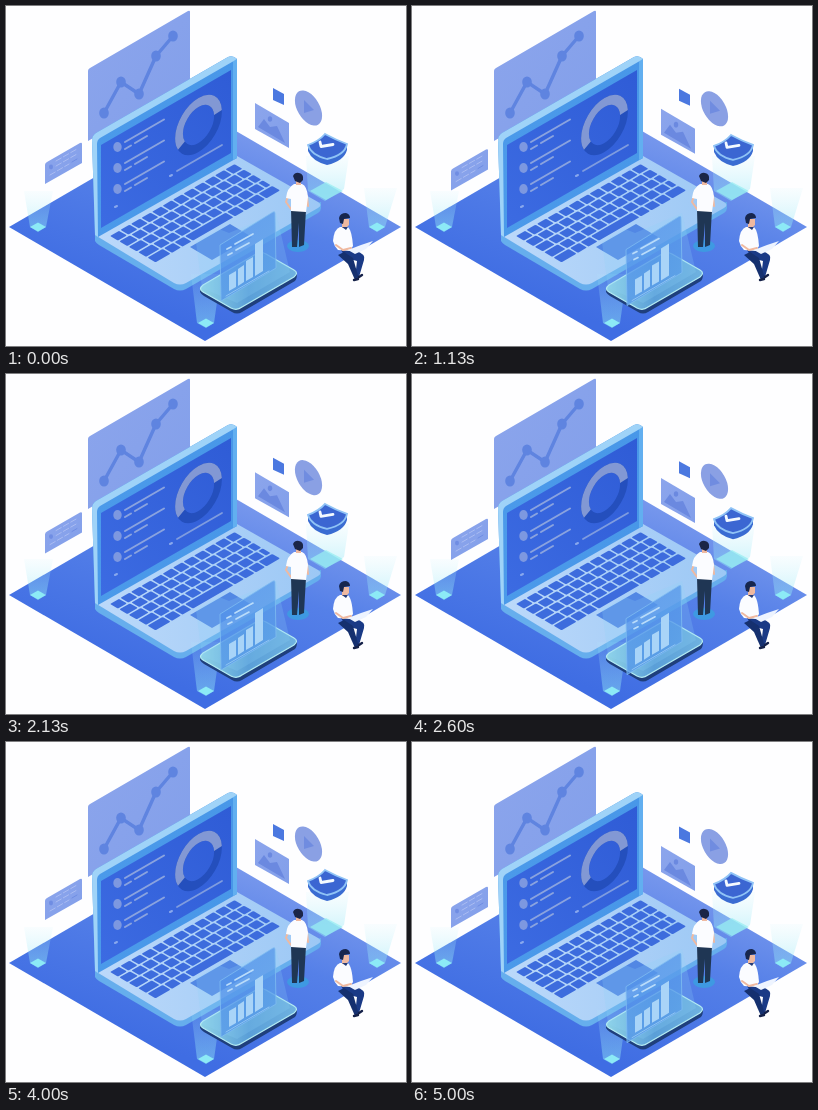
An HTML page for the animation above (5070 ms loop, 400 by 340 pixels).

```html
<!DOCTYPE html>
<html lang="en">
<head>
<meta charset="utf-8">
<title>Isometric workspace</title>
<style>
html, body { margin: 0; width: 100%; height: 100%; overflow: hidden; background: #fefeff; }
svg { display: block; width: 400px; height: 340px; }
.line { fill: none; stroke-linecap: round; stroke-linejoin: round; }
</style>
</head>
<body>
<svg viewBox="0 0 400 340">
  <defs>
    <linearGradient id="floor" x1=".8" y1=".1" x2=".35" y2=".85">
      <stop offset="0" stop-color="#829fee"/><stop offset=".45" stop-color="#5580e8"/><stop offset="1" stop-color="#3f6de3"/>
    </linearGradient>
    <linearGradient id="screen" x1="0" y1="1" x2="1" y2="0">
      <stop offset="0" stop-color="#3c6be2"/><stop offset="1" stop-color="#2f5cd6"/>
    </linearGradient>
    <linearGradient id="frame" x1="0" y1="0" x2="1" y2="0">
      <stop offset="0" stop-color="#4b9aea"/><stop offset="1" stop-color="#4897e8"/>
    </linearGradient>
    <linearGradient id="deck" x1="0" y1="0" x2="1" y2="0">
      <stop offset="0" stop-color="#bcd9fa"/><stop offset="1" stop-color="#9cc8f5"/>
    </linearGradient>
    <linearGradient id="card" x1="0" y1="0" x2="1" y2="1">
      <stop offset="0" stop-color="#8ca5ec"/><stop offset="1" stop-color="#829fea"/>
    </linearGradient>
    <linearGradient id="beam" x1="0" y1="1" x2="0" y2="0">
      <stop offset="0" stop-color="#8ee6f6" stop-opacity=".5"/><stop offset="1" stop-color="#b8f0fa" stop-opacity=".08"/>
    </linearGradient>
    <linearGradient id="glass" x1="0" y1="0" x2="1" y2="1">
      <stop offset="0" stop-color="#4f8dea"/><stop offset="1" stop-color="#5a9fe8"/>
    </linearGradient>
    <linearGradient id="tablet" x1="0" y1="0" x2="1" y2="0">
      <stop offset="0" stop-color="#8fd3e6"/><stop offset=".5" stop-color="#5a9fd8"/><stop offset="1" stop-color="#6fb2e0"/>
    </linearGradient>
  </defs>

  <!-- floor -->
  <path d="M3 221L199 107L395 221L199 335Z" fill="url(#floor)"/>

  <!-- line chart board -->
  <path d="M82 65Q82 63 84 62L182 5Q184 4 184 6V76L82 135Z" fill="url(#card)"/>
  <path class="line" d="M98 107L115 76L133 88L150 50L167 30" stroke="#5f84e0" stroke-width="3.4"/>
  <g fill="#5f84e0" id="dots"></g>

  <!-- laptop deck -->
  <path d="M89 229V235Q90 237 93 239L168 283Q174 286 180 283L312 207Q315 205 315 202V196Z" fill="#66aeed"/>
  <path d="M89 229L231 150L312 196Q317 199 312 202L180 277Q174 280 168 277Z" fill="url(#deck)"/>
  <g id="keys" transform="matrix(1 -.577 1 .577 104 230)" fill="#3d6cdd"></g>
  <path d="M184 241L224 218L246 231L206 254Z" fill="#5287e4"/>

  <!-- laptop lid -->
  <path d="M86 134Q86 130 90 127L222 51Q227 49 231 53V152L92 231L89 229Z" fill="url(#frame)"/>
  <path d="M227 55L231 53V152L227 154Z" fill="#62aff0"/>
  <path d="M86 134Q86 130 90 127L222 51Q227 49 231 53L226 56L94 132Q91 134 91 138L92 231L89 229Z" fill="#9fd3f8"/>
  <path d="M95 139L225 64V147L95 222Z" fill="url(#screen)"/>
  <g id="list"></g>
  <path class="line" d="M171 165L216 139" stroke="#7f9cdf" stroke-width="1.8"/>
  <path class="line" d="M164 170L166 169M109 201L111 200" stroke="#89a8ed" stroke-width="2"/>
  <g transform="matrix(.866 -.5 0 1 192.5 119)" fill="none" stroke-width="9">
    <circle r="22.5" stroke="#244fbd"/>
    <circle r="22.5" stroke="#8298d4" pathLength="100" stroke-dasharray="57 43" stroke-dashoffset="-42"/>
  </g>

  <!-- corner lamps -->
  <path d="M24 221L18 185H47L40 221L32 226Z" fill="url(#beam)"/>
  <path d="M363 221L358 182H391L379 221L371 226Z" fill="url(#beam)"/>
  <path d="M191 317L185 268H215L208 317L200 322Z" fill="url(#beam)"/>
  <g id="lamps" fill="#8ceaf6"></g>

  <!-- tablet -->
  <path d="M194 282V286Q195 288 198 290L226 306Q231 309 236 306L289 275Q291 273 291 268Z" fill="#1f3f7c"/>
  <path d="M197 279L250 248Q255 245 260 248L288 264Q293 267 288 271L236 301Q231 305 225 302L197 286Q192 283 197 279Z" fill="url(#tablet)" stroke="#b4ecf3" stroke-width="1.2"/>
  <path d="M196 282L190 236L213 223L223 227L270 207L284 266L231 297Z" fill="#8ed3f7" fill-opacity=".22"/>

  <g data-amp="3.5" data-low="800">
    <path d="M214 239L267 206Q269 205 269 207L270 262L215 295Z" fill="url(#glass)" fill-opacity=".75" stroke="#7fbdf2" stroke-width=".8"/>
    <path class="line" d="M221 243L225 241M229 238L247 228M222 249L226 247M230 244L243 237" stroke="#b9dcfa" stroke-width="1.7"/>
    <path d="M223 269L230 265V281L223 285ZM232 263L238 259V276L232 280ZM240 255L247 251V271L240 275ZM249 238L257 233V265L249 270Z" fill="#a9d4f8"/>
    <path class="line" d="M220 290L263 265" stroke="#8fc4f3"/>
  </g>

  <!-- floating cards -->
  <g data-amp="5" data-low="800">
    <path d="M39 159Q39 157 41 156L74 137Q76 136 76 138V157L39 178Z" fill="url(#card)"/>
    <path class="line" d="M50 155L71 143M50 160L71 148M44 169L63 158" stroke="#aabcf2" stroke-dasharray="6 2.5"/>
    <ellipse cx="45" cy="161" rx="2" ry="2.4" fill="#6f8de3"/>
    <path class="line" d="M66 156L71 153" stroke="#6f8de3"/>
  </g>
  <g data-amp="4.3" data-low="800">
    <path d="M249 97L283 117V142L249 123Z" fill="url(#card)"/>
    <path d="M252 121L258 113L264 121L271 120L279 137Z" fill="#6b89e0"/>
    <ellipse cx="264" cy="113" rx="2.2" ry="2.8" fill="#6b89e0"/>
  </g>
  <path data-amp="4" data-low="600" d="M267 82L278 88V99L267 94Z" fill="#4b78e0"/>
  <g data-amp="4" data-low="600">
    <circle r="15.7" transform="matrix(.866 .5 0 1 302.5 102)" fill="#8aa0e4"/>
    <path d="M298 94L308 104L298 107Z" fill="#708ce0"/>
  </g>

  <!-- shield -->
  <path d="M300 150H343L338 183L319 195L302 185Z" fill="url(#beam)"/>
  <path d="M304 185L320 176L337 185L320 194Z" fill="#98eef2" fill-opacity=".75"/>
  <g data-amp="4.7" data-low="600">
    <path d="M302 139V145Q306 155 321 159Q338 155 341 144V138Z" fill="#3a6cd2"/>
    <path d="M302 139Q313 135 319 128Q330 134 341 138Q339 149 321 153Q305 149 302 139Z" fill="#3b66d2" stroke="#8fc3f6" stroke-width="1.8"/>
    <path class="line" d="M314 136L315 140.5L327 138.5" stroke="#f4faff" stroke-width="2.8"/>
  </g>

  <!-- standing man -->
  <ellipse cx="292" cy="240" rx="11" ry="6" fill="#36a5df" fill-opacity=".7"/>
  <path d="M285 203L300 204L299 221L298 239L293 241L293 217L291 241L286 241Z" fill="#1f3654"/>
  <path class="line" d="M282 190L280 196L285 203M301 190L302 200" stroke="#efb9a0" stroke-width="2"/>
  <path d="M288 178L296 178Q301 180 302 191L300 206L285 205L285 193L280 192Q281 182 288 178Z" fill="#fbfcff"/>
  <path d="M290 174H295V179H290Z" fill="#efb9a0"/>
  <path d="M287 170Q289 166 293 167Q298 168 297 174L294 177L289 175Z" fill="#1b2547"/>

  <!-- seated man -->
  <path d="M333 241L350 245Q360 248 358 254L353 271L349 272L351 255L340 252Z" fill="#1a3a86"/>
  <path d="M338 246L347 252L353 273L349 274L342 258L332 249Z" fill="#15306f"/>
  <path class="line" d="M348 274L352 273M353 271L356 269" stroke="#142048" stroke-width="2.4"/>
  <path d="M334 221L342 221Q346 225 347 240L344 245L332 244Q328 240 327 235Q328 223 334 221Z" fill="#fbfcff"/>
  <path class="line" d="M330 239L337 244L345 242" stroke="#efb9a0" stroke-width="2"/>
  <path d="M342 244L355 239L367 235L360 243L349 248Z" fill="#eef4ff"/>
  <path d="M336 213H343V219L340 222H336Z" fill="#efb9a0"/>
  <path d="M333 212Q334 207 340 207Q344 208 344 212L338 213L337 218L334 217Z" fill="#17264e"/>
  <path d="M336 221L342 221L340 224Z" fill="#263d78"/>
</svg>
<script>
const add = (id, html) => document.getElementById(id).innerHTML += html;

[[98, 107], [115, 76], [133, 88], [150, 50], [167, 30]].forEach(([x, y]) =>
  add('dots', `<ellipse cx="${x}" cy="${y}" rx="4.8" ry="5.6"/>`));

[[32, 221], [371, 221], [200, 317]].forEach(([x, y]) =>
  add('lamps', `<path d="M${x - 8} ${y}l8 -4.5 8 4.5 -8 4.5z"/>`));

for (let i = 0; i < 3; i++) {
  add('list', `<g transform="translate(0 ${i * 21})" stroke="#8aa3df">
    <ellipse cx="111.5" cy="141" rx="4.2" ry="4.9" fill="#7d98e0" stroke="none"/>
    <path class="line" d="M119 136L158 113.5M119 143L125 139.5M129 137L141 130" stroke-width="2"/></g>`);
}

const ROW = 9.4, COL = 10.5, WIDTH = 126;
const key = (x, row, w) =>
  add('keys', `<rect x="${x}" y="${row * ROW}" width="${w - 1.5}" height="${ROW - 1.5}" rx="1"/>`);
for (let row = 0; row < 5; row++) {
  for (let x = 0; x < WIDTH;) {
    let w = x ? COL : COL + row * 1.5;
    if (row === 4 && x > 30 && x < 45) w = COL * 4;
    if (WIDTH - x - w < 6) w = WIDTH - x;
    key(x, row, w);
    x += w;
  }
}

// Everything that floats shares a 2 s wave, stepped at 15 pictures a second.
const LOOP = 5070, STEP = 1000 / 15, PERIOD = 2000;
const floaters = [...document.querySelectorAll('[data-amp]')];
const wave = (t, low) => Math.cos(2 * Math.PI * (t - low) / PERIOD);

function draw(now) {
  const t = Math.min(75, Math.floor((now % LOOP + 4) / STEP)) * STEP;
  for (const el of floaters) {
    const { amp, low } = el.dataset;
    el.setAttribute('transform', `translate(0 ${amp * (wave(t, low) - wave(0, low))})`);
  }
}

let start;
function tick(now) {
  start ??= now;
  draw(now - start);
  requestAnimationFrame(tick);
}
draw(0);
requestAnimationFrame(tick);
</script>
</body>
</html>
```
